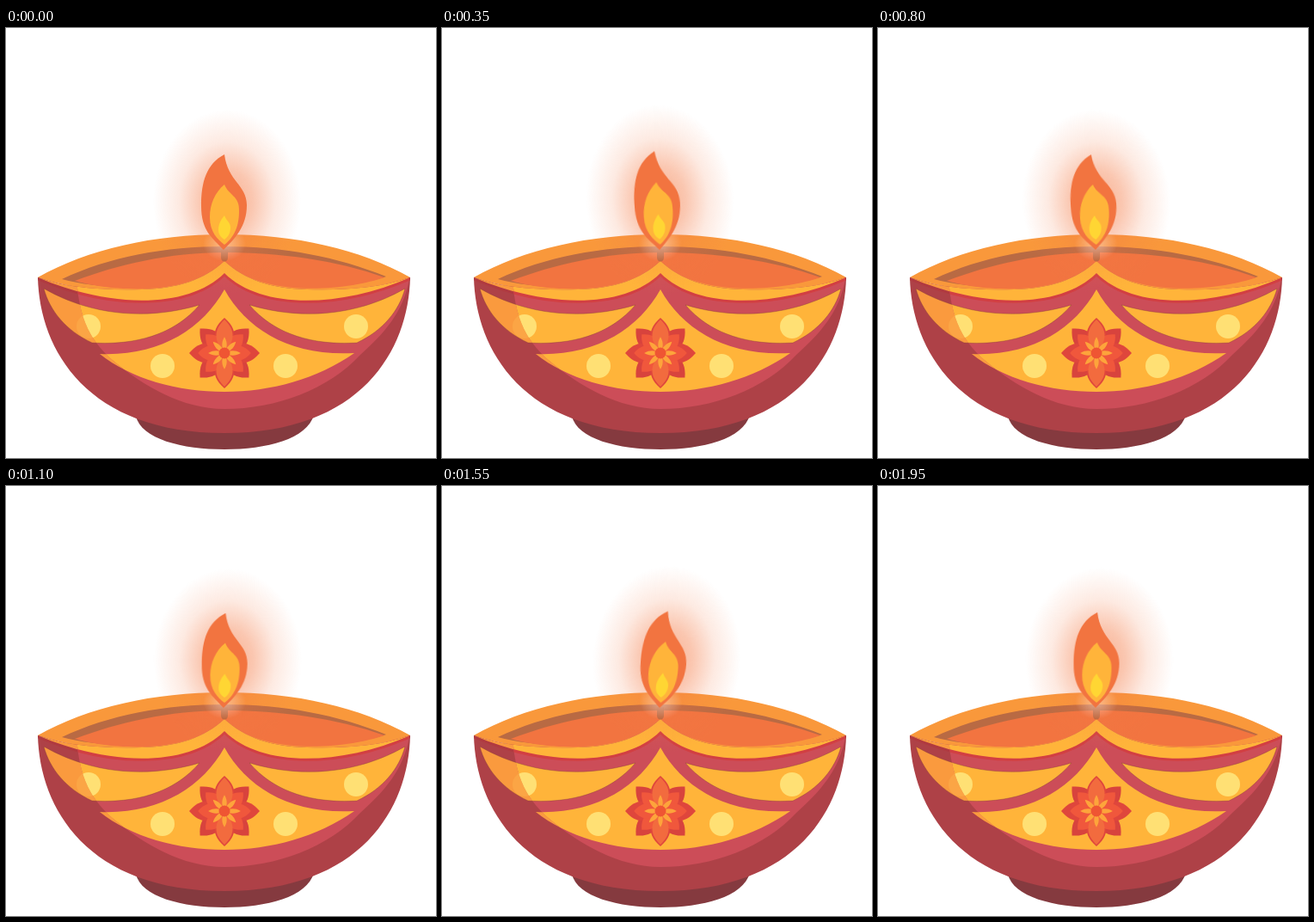
Write an HTML page that moves like this. It is 500 px wide and 500 px high and loops after 2000 ms.

```html
<!DOCTYPE html>
<html lang="en">
<head>
<meta charset="utf-8">
<title>Oil lamp</title>
<style>
  html, body { margin: 0; width: 100%; height: 100%; overflow: hidden; background: #fff; }
  svg { display: block; width: 100vw; height: 100vh; }

  .shade { --gold: #fa9a3e; --red: #ae4147; --dot: #fba545; --edge: #b03a40; }
  .lit { --gold: #ffb43a; --red: #cc4d58; --dot: #ffe074; --edge: #d23f42; }
  .gold { fill: var(--gold); }
  .red { fill: var(--red); }
  .dot { fill: var(--dot); }
  .edge { fill: none; stroke: var(--edge); stroke-width: 6; }
  .swag { fill: var(--gold); stroke: #7d3a35; stroke-opacity: .45; stroke-width: .8; }

  .sway, .pulse { transform-origin: 253px 257px; }
  .sway { animation: sway 2s cubic-bezier(.37, 0, .63, 1) infinite; }
  .pulse { animation: pulse 2s ease-in-out infinite; }

  @keyframes sway {
    0% { transform: rotate(0deg); animation-timing-function: cubic-bezier(.39, .575, .565, 1); }
    30% { transform: rotate(-4.2deg); }
    76% { transform: rotate(4.5deg); animation-timing-function: cubic-bezier(.47, 0, .745, .715); }
    100% { transform: rotate(0deg); }
  }
  @keyframes pulse {
    0%, 100% { transform: scaleY(1); }
    18% { transform: scaleY(1.035); }
    40% { transform: scaleY(1); }
    62% { transform: scaleY(.992); }
    82% { transform: scaleY(1.02); }
  }
</style>
</head>
<body>
<svg viewBox="0 0 500 500">
  <defs>
    <radialGradient id="glow">
      <stop offset="0" stop-color="#f47a45" stop-opacity=".6"/>
      <stop offset=".35" stop-color="#f47a45" stop-opacity=".42"/>
      <stop offset=".65" stop-color="#f47a45" stop-opacity=".16"/>
      <stop offset="1" stop-color="#f47a45" stop-opacity="0"/>
    </radialGradient>
    <radialGradient id="halo">
      <stop offset="0" stop-color="#fff" stop-opacity=".42"/>
      <stop offset="1" stop-color="#fff" stop-opacity="0"/>
    </radialGradient>

    <path id="body" d="M37 290C39 375 95 471 254 471S468 375 470 290C434 303 393 305 350 304C308 303 278 293 254 271C230 293 200 303 158 304C115 305 73 303 37 290Z"/>
    <clipPath id="bodyClip"><use href="#body"/></clipPath>
    <clipPath id="litClip">
      <path d="M82 270C80 340 102 367 126 388C160 416 205 443 254 443C315 443 375 420 412 380C440 355 462 330 469 292V270Z"/>
    </clipPath>

    <path id="swag" d="M44 303C100 335 165 340 225 322C195 357 150 369 100 366C70 352 51 329 44 303Z"/>
    <path id="petal" d="M0 0C-9 -10 -20 -24 0 -41C20 -24 9 -10 0 0Z"/>

    <g id="pattern">
      <use href="#body" class="red"/>
      <path class="edge" clip-path="url(#bodyClip)" d="M470 290C387 326 296 327 254 285C212 327 120 326 37 290"/>
      <use href="#swag" class="swag"/>
      <use href="#swag" class="swag" transform="matrix(-1 0 0 1 508 0)"/>
      <path class="gold" d="M254 304C228 351 177 382 109 379C145 408 200 423 254 423S362 408 405 378C331 382 280 351 254 304Z"/>
      <g class="dot">
        <circle cx="96" cy="347" r="14"/>
        <circle cx="407" cy="347" r="14"/>
        <circle cx="182" cy="393" r="14"/>
        <circle cx="325" cy="393" r="14"/>
      </g>
      <path class="gold" d="M37 290C73 303 115 305 158 304C200 303 230 293 254 271C278 293 308 303 350 304C393 305 434 303 470 290C387 326 296 327 254 285C212 327 120 326 37 290Z"/>
    </g>

    <g id="cross">
      <use href="#petal"/>
      <use href="#petal" transform="rotate(90)"/>
      <use href="#petal" transform="rotate(180)"/>
      <use href="#petal" transform="rotate(270)"/>
    </g>
    <g id="ray">
      <use href="#petal" transform="scale(.24 .46)"/>
      <use href="#petal" transform="rotate(180) scale(.24 .46)"/>
    </g>
  </defs>

  <!-- foot -->
  <path fill="#853a3f" d="M151 451C157 478 205 490 254 490S350 478 358 450Z"/>

  <!-- back rim and oil -->
  <path fill="#f9983b" d="M37 290C95 257 172 240 254 240S412 257 470 290C410 310 310 320 254 282C198 320 98 310 37 290Z"/>
  <path fill="#b96a43" d="M65 292C120 266 185 254 254 254S385 266 442 289C400 302 300 312 254 272C208 312 110 304 65 292Z"/>
  <path fill="#f27440" d="M80 294C130 275 190 261 254 261S385 270 440 290C400 304 302 316 254 272C206 316 115 304 80 294Z"/>

  <!-- bowl -->
  <use href="#pattern" class="shade"/>
  <g clip-path="url(#litClip)"><use href="#pattern" class="lit"/></g>

  <!-- flower -->
  <g transform="translate(254 378)">
    <use href="#cross" fill="#d8433d" transform="rotate(45) scale(.98)"/>
    <use href="#cross" fill="#df463c"/>
    <use href="#cross" fill="#f0573c" transform="rotate(45) scale(.75)"/>
    <use href="#cross" fill="#f0573c" transform="scale(.75)"/>
    <use href="#petal" fill="#f26b3e" transform="scale(.85 .95)"/>
    <use href="#petal" fill="#f26b3e" transform="rotate(180) scale(.85 .95)"/>
    <g fill="#fda43b">
      <use href="#ray"/>
      <use href="#ray" transform="rotate(45)"/>
      <use href="#ray" transform="rotate(90)"/>
      <use href="#ray" transform="rotate(135)"/>
    </g>
    <circle r="6.5" fill="#ef5533"/>
  </g>

  <!-- wick -->
  <path fill="#b5653f" d="M250 257H258V267C258 273 250 273 250 267Z"/>

  <!-- flame -->
  <g class="sway"><g class="pulse">
    <ellipse cx="257" cy="202" rx="86" ry="107" fill="url(#glow)"/>
    <ellipse cx="254" cy="251" rx="25" ry="20" fill="url(#halo)"/>
    <path fill="#f27440" d="M254 147C233 158 227 179 227 207C227 236 240 244 253 258C266 245 280 231 280 206C280 182 258 179 254 147Z"/>
    <path fill="#ffb43a" d="M254 182C243 191 237 205 237 220C237 237 246 246 254 252C263 245 271 234 271 213C272 195 259 195 254 182Z"/>
    <path fill="#ffd633" d="M254 218C249 224 247 229 247 235C247 241 251 244 254 246C258 243 261 239 261 232C261 226 256 224 254 218Z"/>
  </g></g>
</svg>
</body>
</html>
```
